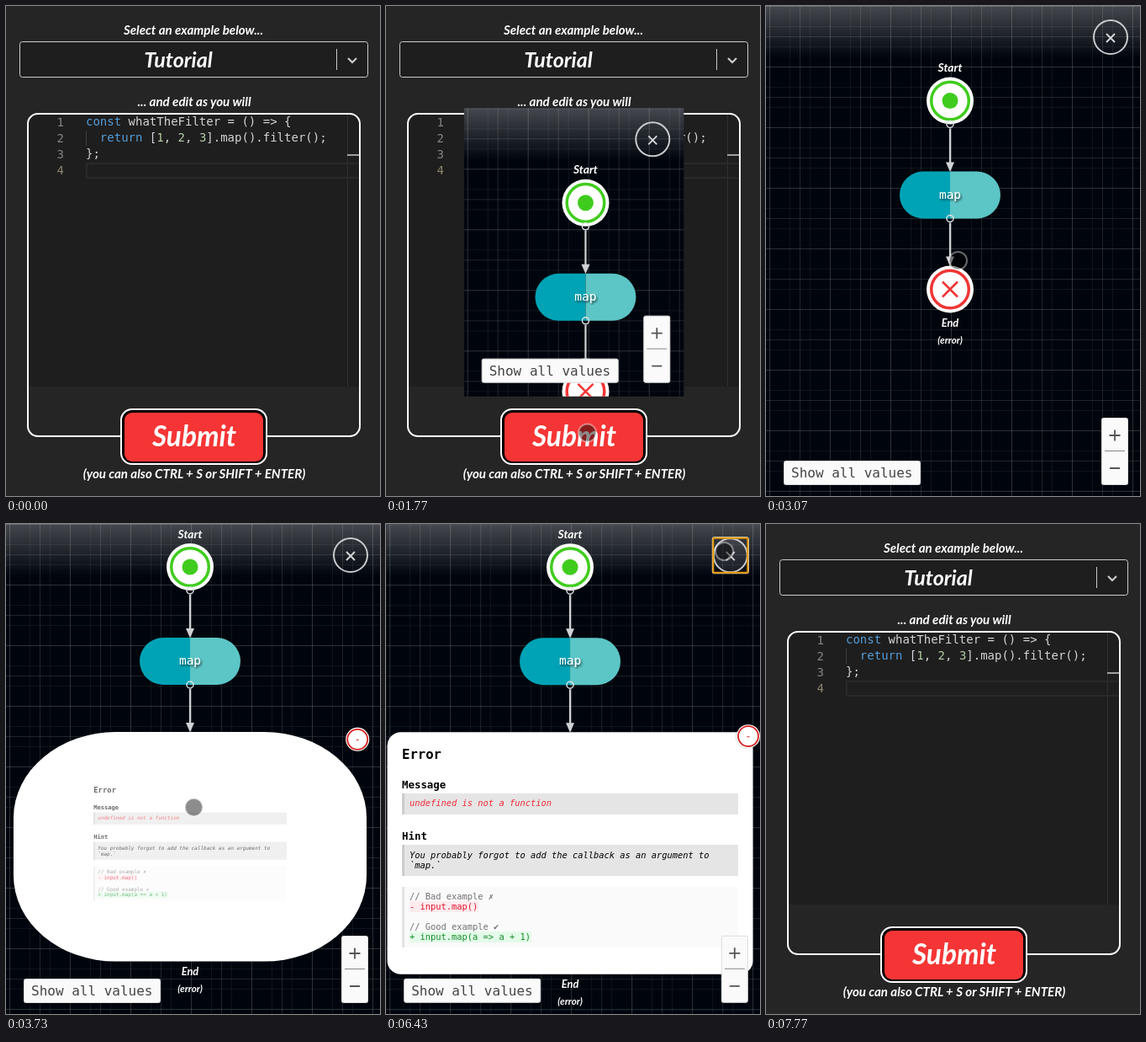
Write an HTML page that moves like this. It is 445 px wide and 582 px high and loops after 8210 ms.

```html
<!DOCTYPE html>
<html lang="en">
<head>
<meta charset="utf-8">
<title>Code visualiser</title>
<style>
  html, body { margin: 0; width: 100%; height: 100%; overflow: hidden; background: #252525; }
  #stage { display: block; width: 445px; height: 582px; }
  text { white-space: pre; }
  .hand { font: italic 700 15.1px Lato, "Open Sans", sans-serif; fill: #fff; text-anchor: middle; }
  .mono { font-family: "DejaVu Sans Mono", "Noto Sans Mono", monospace; }
  .code { font-size: 14px; fill: #d4d4d4; }
  .kw { fill: #569cd6; }
  .num { fill: #b5cea8; }
  .small { font-size: 10.4px; }
  .bold { font-weight: 700; }
  .it { font-style: italic; }
</style>
</head>
<body>
<svg id="stage" viewBox="0 0 445 582">
  <defs>
    <linearGradient id="sheen" x2="0" y2="1">
      <stop stop-color="#fff" stop-opacity=".27"/>
      <stop offset="1" stop-color="#fff" stop-opacity="0"/>
    </linearGradient>
    <pattern id="major" x="4" y="0" width="36" height="36" patternUnits="userSpaceOnUse">
      <path d="M.5 0V36M0 .5H36" stroke="#fff" stroke-opacity=".12"/>
    </pattern>
    <pattern id="minor" x="4" y="0" width="24" height="24" patternUnits="userSpaceOnUse">
      <path d="M.5 0V24M0 .5H24" stroke="#fff" stroke-opacity=".06"/>
    </pattern>
    <filter id="textShadow"><feDropShadow dx="1.5" dy="2" stdDeviation="1" flood-opacity=".7"/></filter>
    <filter id="softShadow" x="-30%" y="-30%" width="160%" height="160%"><feDropShadow dx="0" dy="0" stdDeviation="1" flood-opacity=".35"/></filter>
    <g id="link">
      <path d="M0 5V48" stroke="#d0d2d6" stroke-width="2.2"/>
      <path d="M-5 45H5L0 56.500Z" fill="#d0d2d6"/>
      <circle r="4" fill="none" stroke="#dfe3e6" stroke-width="1.5"/>
    </g>
  </defs>

  <rect width="445" height="582" fill="#252525"/>
  <text class="hand" x="223" y="34">Select an example below...</text>
  <rect x="16.500" y="42.500" width="414" height="42" rx="3" fill="#1e1e1e" stroke="#ccc"/>
  <text class="hand" x="205" y="72.500" style="font-size:25px">Tutorial</text>
  <path d="M393.500 51V76" stroke="#ccc"/>
  <path d="M407 62L412 67L417 62" fill="none" stroke="#ccc" stroke-width="2.2"/>
  <text class="hand" x="224" y="119">... and edit as you will</text>

  <rect x="27" y="129" width="393" height="323" fill="#1e1e1e"/>
  <path d="M406.500 129V452" stroke="#303030"/>
  <path d="M421 187H96V204H421" fill="none" stroke="#292929" stroke-width="2"/>
  <path d="M95.500 148V166" stroke="#404040"/>
  <path d="M406 177H420" stroke="#a0a0a0" stroke-width="2"/>
  <g class="mono code">
    <g id="lineNumbers" text-anchor="end" fill="#858585"></g>
    <text x="95" y="142"><tspan class="kw">const</tspan> whatTheFilter = () =&gt; {</text>
    <text x="95" y="161">  <tspan class="kw">return</tspan> [<tspan class="num">1</tspan>, <tspan class="num">2</tspan>, <tspan class="num">3</tspan>].map().filter();</text>
    <text x="95" y="180">};</text>
  </g>
  <rect x="26" y="128" width="395" height="383" rx="12" fill="none" stroke="#fff" stroke-width="2"/>

  <rect x="137" y="479" width="173" height="65" rx="13" fill="#000" stroke="#fff" stroke-width="2"/>
  <rect x="141" y="483" width="165" height="58" rx="9" fill="#f53535"/>
  <text class="hand" x="224" y="523" style="font-size:33.500px">Submit</text>
  <text class="hand" x="224" y="561">(you can also CTRL + S or SHIFT + ENTER)</text>

  <svg id="dialog" overflow="hidden">
    <rect width="447" height="585" fill="#00050d"/>
    <rect width="447" height="585" fill="url(#minor)"/>
    <rect width="447" height="585" fill="url(#major)"/>
    <rect width="447" height="62" fill="url(#sheen)"/>

    <g id="graph">
      <text class="hand" y="-34.500" style="font-size:13.800px">Start</text>
      <circle r="28" fill="#fff"/>
      <circle r="22.300" fill="none" stroke="#40cc1e" stroke-width="3.500"/>
      <circle r="9.500" fill="#40cc1e"/>
      <path d="M0 84H-32A28 28 0 0 0 -32 140H0Z" fill="#00a3b5"/>
      <path d="M0 84H32A28 28 0 0 1 32 140H0Z" fill="#5cc5c5"/>
      <text class="mono" y="116" text-anchor="middle" font-size="14.500" fill="#fff" filter="url(#textShadow)">map</text>
      <use href="#link" y="28"/>
      <use href="#link" y="140"/>

      <rect id="endBox" y="196" fill="#fff"/>
      <g id="endIcon" transform="translate(0 224)" fill="none" stroke="#f03535">
        <circle r="22.300" stroke-width="3.500"/>
        <path d="M-9 -9L9 9M9 -9L-9 9" stroke-width="2.500"/>
      </g>

      <g id="details" class="mono">
        <text class="bold" x="-200" y="-112" font-size="15.600">Error</text>
        <text class="bold" x="-200" y="-77" font-size="12.400">Message</text>
        <rect x="-200" y="-71" width="400" height="25" fill="#e5e5e5"/>
        <rect x="-200" y="-71" width="3" height="25" fill="#ccc"/>
        <text class="small it" x="-191" y="-56" fill="#ee2b38">undefined is not a function</text>
        <text class="bold" x="-200" y="-16" font-size="12.400">Hint</text>
        <rect x="-200" y="-10" width="400" height="37" fill="#e5e5e5"/>
        <rect x="-200" y="-10" width="3" height="37" fill="#ccc"/>
        <text class="small it" x="-191" y="6">You probably forgot to add the callback as an argument to</text>
        <text class="small it" x="-191" y="18">`map.`</text>
        <rect x="-200" y="40" width="400" height="72" rx="3" fill="#fafafa"/>
        <rect x="-200" y="40" width="3" height="72" fill="#e2e2e2"/>
        <rect x="-191" y="57" width="82" height="13" fill="#ffecef"/>
        <rect x="-191" y="93" width="145" height="13" fill="#e3fbe9"/>
        <g class="small">
          <text x="-191" y="55" fill="#707070">// Bad example ✗</text>
          <text x="-191" y="67" fill="#e0102a">- input.map()</text>
          <text x="-191" y="91" fill="#707070">// Good example ✔</text>
          <text x="-191" y="103" fill="#118a25">+ input.map(a =&gt; a + 1)</text>
        </g>
      </g>

      <g id="badge">
        <circle r="14" fill="#fff" filter="url(#softShadow)"/>
        <circle r="12" fill="#fff" stroke="#d92020" stroke-width="1.800"/>
        <path d="M-1.500 .5H1.500" stroke="#d92020"/>
      </g>
      <g id="endLabels">
        <text class="hand" y="16.500" style="font-size:12.800px">End</text>
        <text class="hand" y="36.500" style="font-size:11.600px">(error)</text>
      </g>
    </g>

    <g id="close" fill="none">
      <circle id="closeRing" r="20" stroke="#c8cacc" stroke-width="2" fill="#fff"/>
      <path d="M-5 -4L5 6M5 -4L-5 6" stroke="#d8dadc" stroke-width="1.800"/>
      <g id="focus">
        <rect x="-21.500" y="-21.500" width="43" height="43" rx="2" stroke="#fff"/>
        <rect x="-20.500" y="-20.500" width="41" height="41" rx="1" stroke="#e59700" stroke-width="2"/>
      </g>
    </g>
    <g id="showAll">
      <rect x="21.500" y="-44.500" width="162" height="28" rx="2" fill="#fafafa" stroke="#ddd"/>
      <text class="mono" x="30" y="-25" font-size="16" fill="#444">Show all values</text>
    </g>
    <g id="zoom" stroke="#555" stroke-width="1.800">
      <rect x="-47.500" y="-95.500" width="31" height="79" rx="2" fill="#fafafa" stroke="#ddd" stroke-width="1"/>
      <path d="M-38.500 -75H-25.500M-32 -81.500V-68.500M-38 -36H-26"/>
      <path d="M-44 -56.500H-20" stroke="#888" stroke-width="1"/>
    </g>
  </svg>

  <circle id="cursor" r="10.500" fill="#000" fill-opacity=".45" stroke="#fff" stroke-opacity=".4" stroke-width="2"/>
</svg>

<script>
const LOOP = 8210;
const OPEN = 1565, EXPAND = 3465, CLOSE = 6421, DIALOG_MS = 500;
const FULL = { width: 447, height: 585, cx: 223.5, cy: 292.5 };

const $ = id => document.getElementById(id);
const set = (id, attrs) => {
  for (const key in attrs) $(id).setAttribute(key, attrs[key]);
};
const move = (id, x, y, extra = '') => set(id, { transform: `translate(${x} ${y}) ${extra}` });
const show = (id, visible) => { $(id).style.display = visible ? '' : 'none'; };
const mix = (a, b, p) => a + (b - a) * p;
const progress = (t, start, duration) => Math.min(1, Math.max(0, (t - start) / duration));

function bezier(x1, y1, x2, y2) {
  const at = (a, b, u) => 3 * (1 - u) * (1 - u) * u * a + 3 * (1 - u) * u * u * b + u * u * u;
  return x => {
    let lo = 0, hi = 1;
    for (let i = 0; i < 24; i++) {
      const mid = (lo + hi) / 2;
      if (at(x1, x2, mid) < x) lo = mid; else hi = mid;
    }
    return at(y1, y2, (lo + hi) / 2);
  };
}
const ease = bezier(.25, .1, .25, 1);
const easeOut = bezier(0, 0, .58, 1);
const glide = bezier(.3, .15, .7, .9);
const flick = p => 1 - (1 - p) ** 2.5;
const linear = p => p;

// start, end, x, y, easing
const moves = [
  [250, 800, 136.5, 293.5, glide],
  [1000, 1330, 239.5, 507, flick],
  [2270, 3070, 228.5, 302.5, glide],
  [3180, 3230, 223.5, 336.5, linear],
  [3850, 4270, 232.5, 273.5, glide],
  [4270, 5070, 313.5, 99.5, glide],
  [5140, 5900, 402.5, 32.5, glide],
  [6850, 7250, 288, 22.5, glide],
  [7250, 7600, 105.5, -2.5, flick],
];

function cursorAt(t) {
  let x = 48, y = -12;
  for (const [start, end, toX, toY, easing] of moves) {
    if (t < start) break;
    const p = easing(progress(t, start, end - start));
    x = mix(x, toX, p);
    y = mix(y, toY, p);
  }
  return [x, y];
}

function drawDialog(t) {
  const scale = t < CLOSE
    ? easeOut(progress(t, OPEN, DIALOG_MS))
    : easeOut(1 - progress(t, CLOSE, DIALOG_MS));
  show('dialog', scale > 0);
  if (!scale) return;

  const width = FULL.width * scale, height = FULL.height * scale;
  set('dialog', { x: FULL.cx - width / 2, y: FULL.cy - height / 2, width, height });
  move('close', width - 37, 37);
  move('showAll', 0, height);
  move('zoom', width, height);
  set('closeRing', { 'fill-opacity': t > 5700 ? .07 : 0 });
  show('focus', t >= CLOSE);

  const expanded = t >= EXPAND;
  move('graph', 219 - 179 * (1 - scale), expanded ? 51 : 112.5);
  drawEnd(t, expanded);
}

// The box takes the size of its details at once; only its padding grows.
function drawEnd(t, expanded) {
  const reveal = ease(progress(t, EXPAND, 800));
  const padding = 35 * reveal;
  const width = expanded ? 400 + padding : 56;
  const height = expanded ? 252.5 + padding : 56;
  set('endBox', {
    x: -width / 2, width, height,
    rx: mix(width * .63, 16, reveal),
    ry: mix(height * .8, 16, reveal),
  });
  show('endIcon', !expanded);
  move('details', 0, 196 + height / 2, `scale(${reveal})`);
  set('details', { opacity: reveal });
  show('details', expanded);
  show('badge', expanded);
  move('badge', width / 2 - mix(18, 5.5, reveal), 196 + mix(14, 5, reveal));
  move('endLabels', 0, 196 + height);
}

function draw(t) {
  drawDialog(t);
  show('cursor', t >= 250 && t < 7770);
  move('cursor', ...cursorAt(t));
}

for (let n = 1; n <= 4; n++) {
  $('lineNumbers').insertAdjacentHTML('beforeend',
    `<text x="69" y="${124 + 19 * n}"${n === 4 ? ' fill="#8f8470"' : ''}>${n}</text>`);
}

const began = performance.now();
function tick() {
  draw((performance.now() - began) % LOOP);
  requestAnimationFrame(tick);
}
tick();
</script>
</body>
</html>
```
